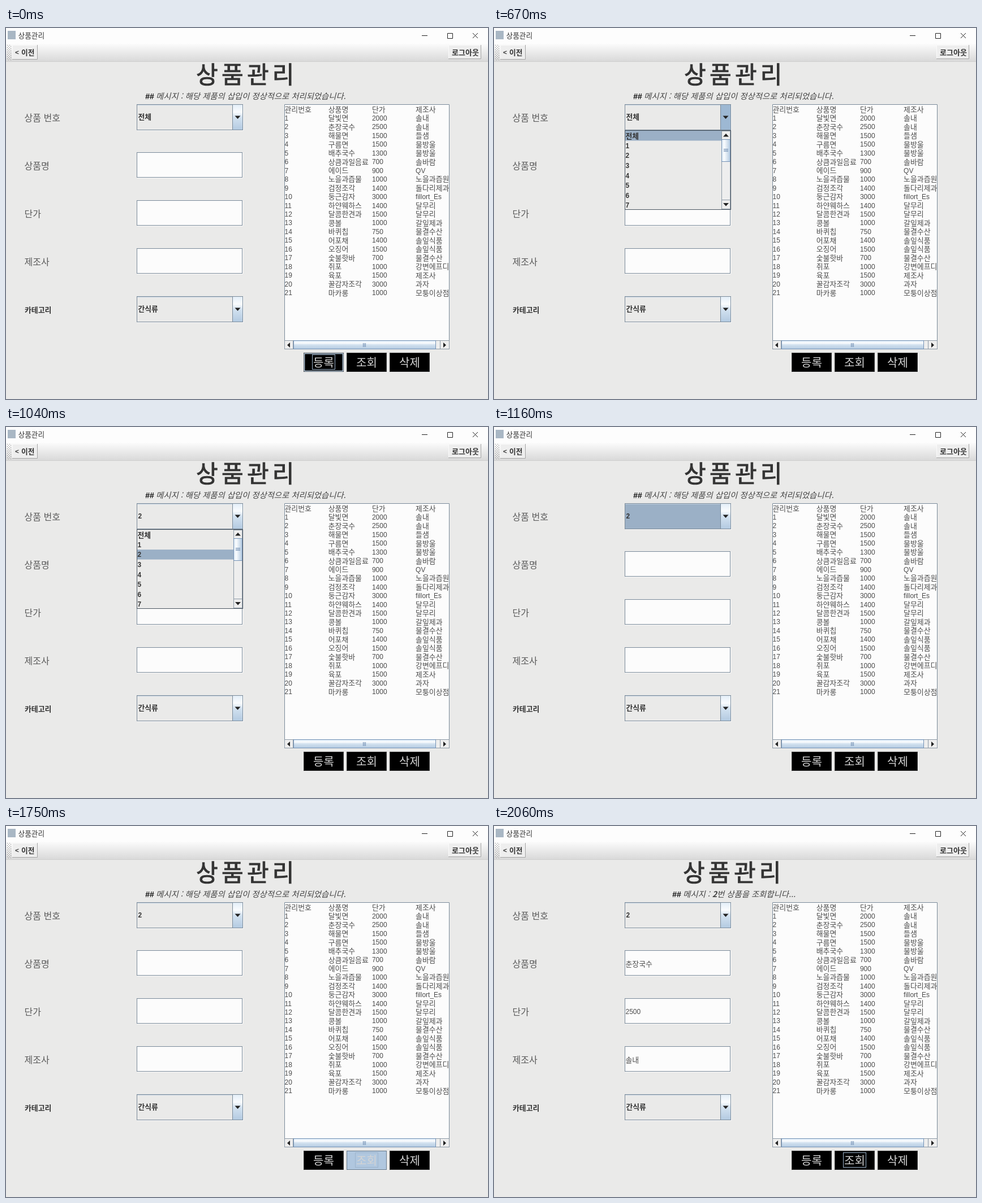
An HTML page for the animation above (2720 ms loop, 852x657 px).

```html
<!DOCTYPE html>
<html lang="ko">
<head>
<meta charset="utf-8">
<title>상품관리</title>
<style>
html, body { margin: 0; width: 100%; height: 100%; overflow: hidden; background: #eaeae9; }
svg { display: block; width: 852px; height: 657px; }
text { font-family: "Noto Sans CJK KR", "Noto Sans CJK", sans-serif; fill: #333; white-space: pre; }
.latin { font-family: "Liberation Sans", Arial, sans-serif; }
.bold { font-weight: 700; }
.thin { font-weight: 300; fill: #5a5a5a; }
.cell { font-weight: 300; fill: #4c4c4c; }
.slant { font-style: italic; }
</style>
</head>
<body>
<svg id="stage" viewBox="0 0 852 657"></svg>
<script>
const LOOP = 2720;
const EDGE = '#7a8a99', PICK = '#9bb0c6', BG = '#eaeae9';

const rows = [
  ['관리번호', '상품명', '단가', '제조사'],
  ['1', '달빛면', '2000', '솔내'],
  ['2', '춘장국수', '2500', '솔내'],
  ['3', '해물면', '1500', '들샘'],
  ['4', '구름면', '1500', '물방울'],
  ['5', '배추국수', '1300', '물방울'],
  ['6', '상큼과일음료', '700', '솔바람'],
  ['7', '에이드', '900', 'QV'],
  ['8', '노을과즙물', '1000', '노을과즙원'],
  ['9', '검정조각', '1400', '돌다리제과'],
  ['10', '둥근감자', '3000', 'fillort_Es'],
  ['11', '하얀웨하스', '1400', '달무리'],
  ['12', '달콤한견과', '1500', '달무리'],
  ['13', '콩볼', '1000', '갈잎제과'],
  ['14', '바퀴칩', '750', '물결수산'],
  ['15', '어포채', '1400', '솔잎식품'],
  ['16', '오징어', '1500', '솔잎식품'],
  ['17', '숯불핫바', '700', '물결수산'],
  ['18', '쥐포', '1000', '강변에프디'],
  ['19', '육포', '1500', '제조사'],
  ['20', '꿀감자조각', '3000', '과자'],
  ['21', '마카롱', '1000', '모퉁이상점']
];

const rect = (x, y, w, h, fill, more = '') =>
  `<rect x="${x}" y="${y}" width="${w}" height="${h}" fill="${fill}" ${more}/>`;
const box = (x, y, w, h, fill, stroke, more = '') =>
  rect(x + .5, y + .5, w - 1, h - 1, fill, `stroke="${stroke}" ${more}`);
const line = (d, stroke, more = '') => `<path d="${d}" fill="none" stroke="${stroke}" ${more}/>`;
const shape = (d, fill) => `<path d="${d}" fill="${fill}"/>`;

// Dark outline with a light edge below and to the right.
const sunken = (x, y, w, h, fill, more = '') =>
  box(x, y, w - 1, h - 1, fill, EDGE, more) +
  line(`M${x + 1} ${y + h - .5}H${x + w - .5}V${y + 1}`, '#fbfbfb');

// Text centred vertically on cy; pure Latin runs use the narrower face.
function text(x, cy, size, str, cls = '', more = '') {
  const latin = !/[가-힣]/.test(str);
  const s = latin ? size * .93 : size;
  const safe = str.replace(/</g, '&lt;');
  return `<text x="${x}" y="${cy + s * .365}" font-size="${s}" class="${cls}${latin ? ' latin' : ''}" ${more}>${safe}</text>`;
}

function bevel(x, y, w, h) {
  return rect(x, y, w, h, '#eeeeee') +
    line(`M${x + .5} ${y + h}V${y + .5}H${x + w}`, '#fafafa') +
    line(`M${x} ${y + h - .5}H${x + w - .5}V${y}`, '#a4a4a4');
}

function windowBar() {
  return rect(0, 0, 852, 28, '#fdfdfd') +
    rect(3, 5, 14, 15, '#a9b7c4') +
    text(21.5, 13.5, 12.7, '상품관리') +
    line('M735 13.5H745M780.5 9.5H789.5V18.5H780.5ZM825 9L834 18M834 9L825 18', '#222') +
    rect(0, 28, 852, 31, 'url(#bar)') + rect(0, 59, 852, 1, '#cfcfcf') +
    rect(1, 30, 8, 27, 'url(#dots)') +
    bevel(11, 30, 45, 26) + text(16, 43, 12.7, '<', 'bold') + text(27, 43, 12.7, '이전', 'bold') +
    bevel(782, 30, 58, 25) + text(788, 43, 13, '로그아웃', 'bold');
}

function combo(y, id, value) {
  return sunken(231, y, 189, 47, BG) +
    line(`M232 ${y + 1.5}H400`, '#c3d3e2') +
    rect(232, y + 2, 168, 43, PICK, `id="${id}Lit" visibility="hidden"`) +
    box(400, y, 19, 46, 'url(#down)', EDGE, `id="${id}Arrow"`) +
    shape(`M404.5 ${y + 20.5}H414.5L409.5 ${y + 26}Z`, '#222') +
    text(233.5, y + 22.5, 12.8, value, 'bold', `id="${id}"`);
}

const field = (y, id) => sunken(231, y, 188, 46, '#fcfcfc') + `<g id="${id}"></g>`;

function table() {
  let out = rect(492, 135, 292, 434, '#fcfcfc') + '<g clip-path="url(#list)">';
  rows.forEach((row, i) => row.forEach((cell, j) => {
    out += text(492.5 + j * 77.2, 144 + i * 15.47, 12.9, cell, 'cell');
  }));
  return out + '</g>' +
    line('M492.5 569V135.5H783.5V569', EDGE) +
    box(492, 553, 292, 16, '#eeeeee', '#8c99a6') +
    line('M507.5 553V569M767.5 553V569', '#8c99a6') +
    shape('M502 557V566L497 561.5Z', '#222') + shape('M773 557V566L778 561.5Z', '#222') +
    box(508, 553, 252, 16, 'url(#down)', '#7592b5') +
    line('M509 554.5H759', '#dcebf8') +
    line('M631.5 558V565M633.5 558V565M635.5 558V565', '#7592b5');
}

function button(x, id, label) {
  return `<g id="${id}">` +
    box(x, 575, 71, 34, '#000', '#333', 'class="face"') +
    line(`M${x + 1} 609.5H${x + 71.5}V576`, '#f4f4f4') +
    box(x + 1, 576, 69, 32, 'none', '#b5c9dc', 'class="hot" stroke-width="1.6"') +
    box(x + 15, 578, 41, 27, 'none', '#9db4cc', 'class="ring"') +
    text(x + 17, 592.5, 20, label, 'thin', 'style="fill:#d4d4d4"') + '</g>';
}

function popup() {
  let out = '<g id="popup">' + box(231, 181, 188, 141, BG, '#4a5560') +
    rect(232, 182, 170, 17.5, PICK, 'id="pick"');
  for (let i = 0; i < 8; i++)
    out += text(232.5, 191 + i * 17.55, 12.8, i ? String(i) : '전체', 'bold');
  return out +
    box(402, 182, 16, 139, '#eeeeee', '#8c99a6') +
    line('M402 197.5H418M402 304.5H418', '#8c99a6') +
    shape('M405 192.5H415L410 187Z', '#222') + shape('M405 310H415L410 315.5Z', '#222') +
    box(402, 197, 16, 40, 'url(#side)', '#7592b5') +
    line('M406 214.5H414M406 216.5H414M406 218.5H414', '#7592b5') + '</g>';
}

function message(id, x, parts) {
  const spans = parts.map(([s, b]) => `<tspan class="${b ? 'bold' : ''}">${s}</tspan>`).join('');
  return `<g id="${id}">` + text(x, 121, 15.2, '##', 'bold slant', 'style="fill:#111"') +
    `<text x="${x + 19}" y="126" font-size="14.35" class="slant" style="fill:#444">${spans}</text></g>`;
}

const grad = (id, dir, ...stops) => `<linearGradient id="${id}" x2="${dir ? 0 : 1}" y2="${dir}">` +
  stops.map(([o, c]) => `<stop offset="${o}" stop-color="${c}"/>`).join('') + '</linearGradient>';

const stage = document.getElementById('stage');
stage.innerHTML = '<defs>' +
  grad('bar', 1, [0, '#fbfbfb'], [1, '#d9d9d9']) +
  grad('down', 1, [0, '#e3eef8'], [.3, '#fafcfe'], [.5, '#d3e2f0'], [1, '#b3cae1']) +
  grad('side', 0, [0, '#dce9f5'], [.3, '#fafcfe'], [1, '#b3cae1']) +
  '<pattern id="dots" width="4" height="4" patternUnits="userSpaceOnUse">' +
  rect(0, 0, 1, 1, '#888') + rect(2, 2, 1, 1, '#888') + '</pattern>' +
  '<clipPath id="list">' + rect(492, 135, 291.5, 418, '#000') + '</clipPath></defs>' +
  rect(0, 0, 852, 657, BG) + windowBar() +
  text(336, 83, 42, '상품관리', '', 'id="title" letter-spacing="6.3" stroke="#333" stroke-width="1"') +
  message('saved', 246, [['메시지 : 해당 제품의 삽입이 정상적으로 처리되었습니다.']]) +
  message('found', 315, [['메시지 : '], ['2', true], ['번 상품을 조회합니다...']]) +
  ['상품 번호', '상품명', '단가', '제조사'].map((s, i) => text(32.5, 159.5 + i * 85, 16, s, 'thin')).join('') +
  text(33, 499, 12.9, '카테고리', 'bold') +
  combo(135, 'number', '전체') + field(220, 'name') + field(305, 'price') + field(390, 'maker') +
  combo(475, 'kind', '간식류') + table() +
  button(526, 'add', '등록') + button(602, 'look', '조회') + button(678, 'remove', '삭제') +
  popup();

const $ = id => document.getElementById(id);
const show = (el, on) => el.setAttribute('visibility', on ? 'visible' : 'hidden');

['name', 'price', 'maker'].forEach((id, i) => {
  $(id).innerHTML = text(232.5, 244 + i * 85, 12.9, rows[2][i + 1], 'cell');
});

const steps = [
  [0, { value: '전체', hot: 'add', focus: 'add', pick: 0 }],
  [270, { hot: '' }],
  [670, { open: true, focus: '', armed: true }],
  [760, { armed: false }],
  [850, { pick: 1, value: '1' }],
  [1010, { pick: 2, value: '2' }],
  [1160, { open: false, lit: true }],
  [1190, { lit: false }],
  [1410, { hot: 'look' }],
  [1620, { press: 'look', focus: 'look' }],
  [1770, { press: '', found: true }],
  [2030, { hot: '' }]
];

function paint(s) {
  const num = $('number'), size = s.value === '전체' ? 12.8 : 11.9;
  num.textContent = s.value;
  num.setAttribute('font-size', size);
  num.setAttribute('class', size < 12 ? 'bold latin' : 'bold');
  num.setAttribute('y', 157.5 + size * .365);
  show($('numberLit'), s.lit);
  $('numberArrow').setAttribute('fill', s.armed ? '#9db8d3' : 'url(#down)');
  show($('popup'), s.open);
  $('pick').setAttribute('y', 182 + s.pick * 17.55);
  for (const id of ['add', 'look', 'remove']) {
    const b = $(id), down = s.press === id;
    const face = b.querySelector('.face');
    face.setAttribute('fill', down ? '#b0c7df' : '#000');
    face.setAttribute('stroke', down ? '#66788a' : '#333');
    show(b.querySelector('.hot'), s.hot === id && !down);
    show(b.querySelector('.ring'), s.focus === id);
  }
  show($('saved'), !s.found);
  for (const id of ['found', 'name', 'price', 'maker']) show($(id), s.found);
  $('title').setAttribute('x', s.found ? 334 : 336);
}

let last = -1;
function tick() {
  const t = performance.now() % LOOP;
  const n = steps.filter(([at]) => at <= t).length;
  if (n !== last) {
    last = n;
    paint(Object.assign({}, ...steps.slice(0, n).map(([, change]) => change)));
  }
  requestAnimationFrame(tick);
}
tick();
</script>
</body>
</html>
```
